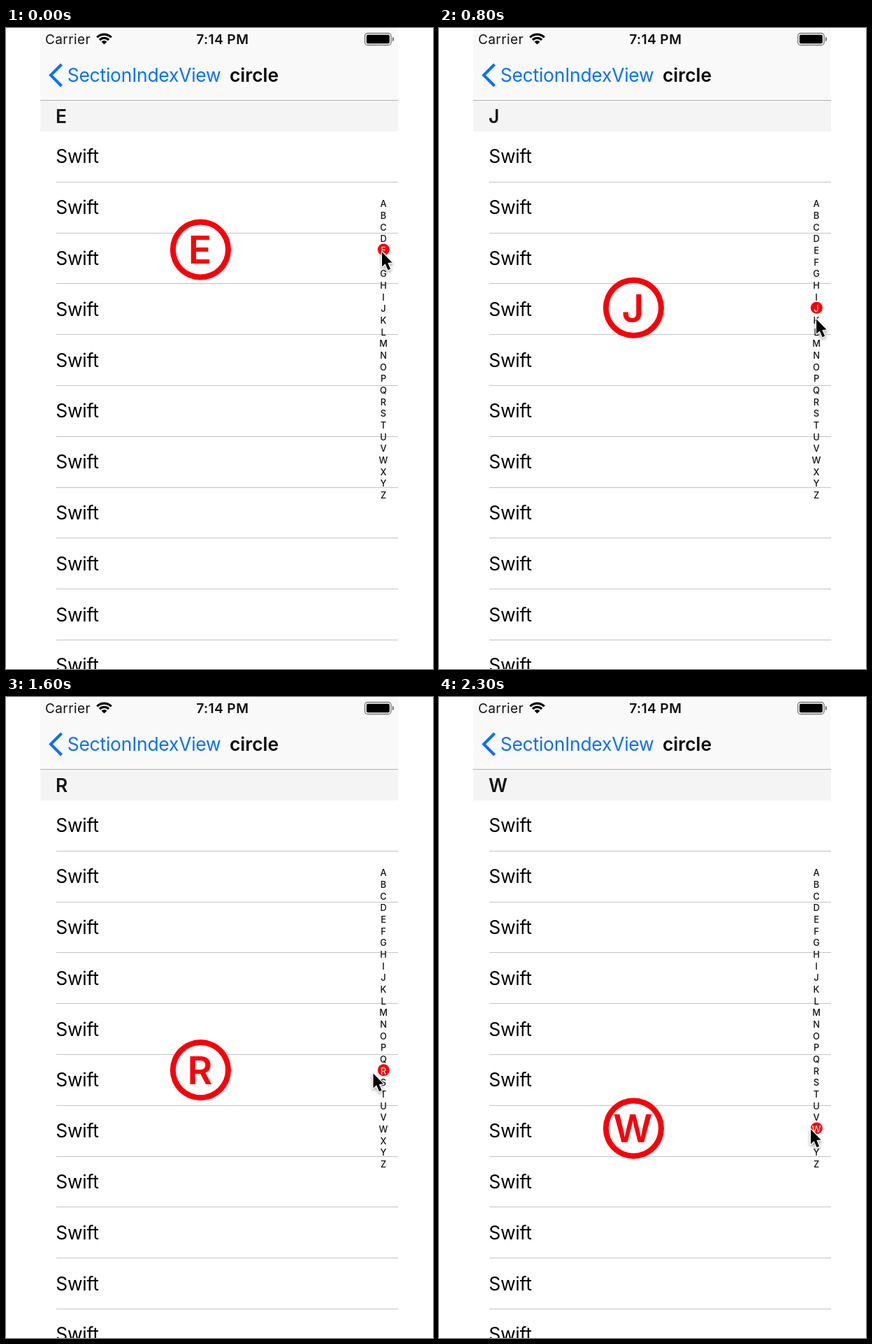
These frames come from a looping animation (611 by 917 pixels, 2.4 s). An HTML page with a canvas:

```html
<!DOCTYPE html>
<html lang="en">
<head>
<meta charset="utf-8">
<title>Section index</title>
<style>
html, body { margin: 0; width: 100%; height: 100%; overflow: hidden; background: #fff; }
canvas { display: block; }
</style>
</head>
<body>
<canvas id="stage" width="611" height="917"></canvas>
<script>
const ctx = document.getElementById('stage').getContext('2d');
const LEFT = 49, RIGHT = 561;
const RED = '#f8000a', BLUE = '#0a70fb';
const STEP = 100, LOOP = 2400;
const ALPHABET = 'ABCDEFGHIJKLMNOPQRSTUVWXYZ';
// selected section at each step
const SECTIONS = 'EEFGHHIIJKMNOOPQRSTTUVVW';
// pointer path: time, x, y
const PATH = [
  [0, 537.5, 319], [400, 537.5, 370], [800, 539.5, 415], [1100, 531.5, 472],
  [1400, 532.5, 504], [1800, 517.5, 570], [2300, 531.5, 617], [2400, 531.5, 617]
];

function text(str, x, y, size, { weight = 400, color = '#000', align = 'left', spacing = 0 } = {}) {
  ctx.font = `${weight} ${size}px Inter, "Liberation Sans", sans-serif`;
  ctx.letterSpacing = spacing + 'px';
  ctx.textAlign = align;
  ctx.fillStyle = color;
  ctx.fillText(str, x, y);
}

function rect(x, y, w, h, color) {
  ctx.fillStyle = color;
  ctx.fillRect(x, y, w, h);
}

function disc(x, y, r, color) {
  ctx.beginPath();
  ctx.arc(x, y, r, 0, Math.PI * 2);
  ctx.fillStyle = color;
  ctx.fill();
}

function pill(x, y, w, h, r) {
  ctx.beginPath();
  ctx.roundRect(x, y, w, h, r);
}

function wifi(x, y) {
  const a = -Math.PI * 0.75, b = -Math.PI * 0.25;
  ctx.strokeStyle = '#000';
  ctx.lineWidth = 3.2;
  for (const r of [14.4, 9.2]) {
    ctx.beginPath();
    ctx.arc(x, y, r, a, b);
    ctx.stroke();
  }
  ctx.beginPath();
  ctx.moveTo(x, y);
  ctx.arc(x, y, 5.6, a, b);
  ctx.fillStyle = '#000';
  ctx.fill();
}

function battery() {
  pill(513.5, 7.5, 37.5, 17, 4);
  ctx.strokeStyle = '#777';
  ctx.lineWidth = 1.3;
  ctx.stroke();
  pill(515.8, 9.8, 33, 12.4, 2);
  ctx.fillStyle = '#000';
  ctx.fill();
  pill(552.8, 13, 2.2, 6, [0, 2, 2, 0]);
  ctx.fillStyle = '#777';
  ctx.fill();
}

function bars(letter) {
  rect(LEFT, 0, RIGHT - LEFT, 103, '#f9f9f9');
  rect(LEFT, 103, RIGHT - LEFT, 1, '#b0b0b0');
  rect(LEFT, 104, RIGHT - LEFT, 44, '#f4f4f4');

  text('Carrier', 56, 22.8, 19, { spacing: 0.4, color: '#111' });
  wifi(140.5, 23.6);
  text('7:14 PM', 309.7, 22.8, 19.3, { weight: 600, align: 'center', spacing: 0.35, color: '#111' });
  battery();

  ctx.beginPath();
  ctx.moveTo(79.5, 52);
  ctx.lineTo(64, 67.5);
  ctx.lineTo(79.5, 83);
  ctx.strokeStyle = BLUE;
  ctx.lineWidth = 4;
  ctx.stroke();
  text('SectionIndexView', 87.7, 77, 26.4, { color: BLUE, spacing: -0.2 });
  text('circle', 320, 77, 26.4, { weight: 600 });
  text(letter, 71, 136, 26.4, { weight: 600, color: '#151515' });
}

function rows() {
  for (let i = 0; i < 11; i++) {
    const y = 72.8 * i;
    text('Swift', 71.2, 193.3 + y, 26.4, { spacing: -0.2 });
    rect(72, Math.round(219.8 + y), RIGHT - 72, 1, '#c3c3c3');
  }
}

function index(selected) {
  [...ALPHABET].forEach((letter, i) => {
    const on = letter === selected;
    const y = 16.67 * i;
    if (on) disc(540.3, 250.3 + y, 8.5, RED);
    text(letter, 540, 256.4 + y, 12.8, { align: 'center', weight: on ? 400 : 500, color: on ? '#fff' : '#111' });
  });
}

function badge(letter) {
  const y = 250.3 + 16.67 * ALPHABET.indexOf(letter);
  disc(278.4, y, 43.6, RED);
  disc(278.4, y, 35.6, '#fff');
  text(letter, 277.4, y + 20.2, 55, { weight: 600, align: 'center', color: RED });
}

function pointer(t) {
  const k = PATH.findIndex(p => p[0] > t);
  const [t0, x0, y0] = PATH[k - 1], [t1, x1, y1] = PATH[k];
  const u = (t - t0) / (t1 - t0);
  ctx.save();
  ctx.translate(x0 + (x1 - x0) * u, y0 + (y1 - y0) * u);
  ctx.beginPath();
  [[0.5, 1.5], [0.5, 22.5], [5.2, 18.2], [9, 27.3], [12.6, 25.8], [8.8, 16.9], [15, 16.6]]
    .forEach(([x, y]) => ctx.lineTo(x, y));
  ctx.closePath();
  ctx.lineJoin = 'round';
  ctx.lineWidth = 2.6;
  ctx.strokeStyle = '#fff';
  ctx.shadowColor = 'rgba(0,0,0,0.4)';
  ctx.shadowBlur = 4;
  ctx.shadowOffsetY = 2;
  ctx.stroke();
  ctx.shadowColor = 'transparent';
  ctx.fillStyle = '#000';
  ctx.fill();
  ctx.restore();
}

function draw(now) {
  const step = Math.floor((now % LOOP) / STEP);
  const letter = SECTIONS[step];
  rect(0, 0, 611, 917, '#fff');
  rows();
  bars(letter);
  index(letter);
  badge(letter);
  pointer(step * STEP);
}

let start;
function tick(now) {
  start ??= now;
  draw(Math.max(0, now - start));
  requestAnimationFrame(tick);
}
requestAnimationFrame(tick);
</script>
</body>
</html>
```
